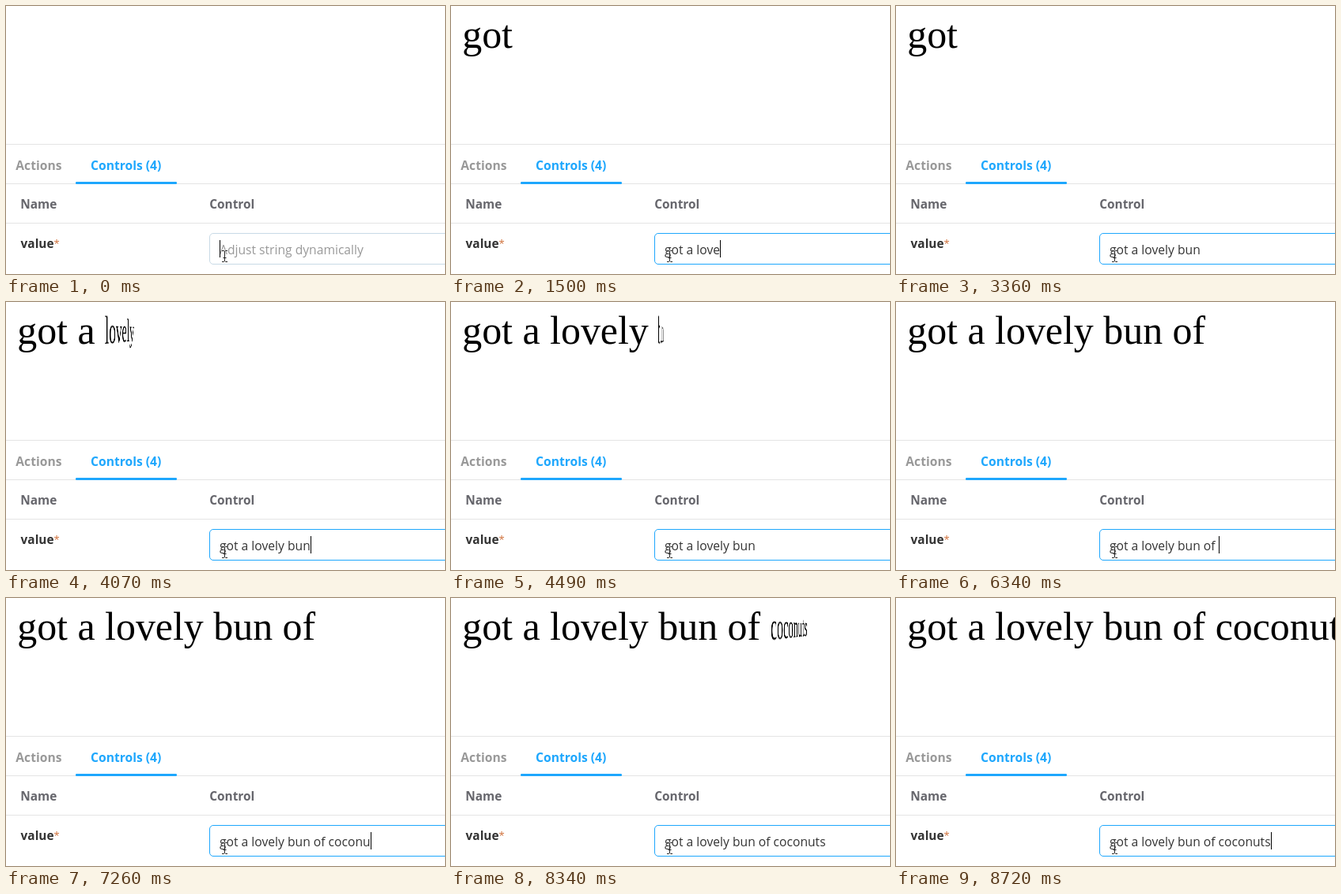
Write an HTML page that moves like this. It is 555x340 px and loops after 9.12 s.

```html
<!DOCTYPE html>
<html lang="en">
<head>
<meta charset="utf-8">
<title>Text control</title>
<style>
  html, body { margin: 0; width: 100%; height: 100%; overflow: hidden; background: #fff; }
  #stage { position: relative; width: 555px; height: 340px; overflow: hidden; }
  #ui { position: absolute; inset: 0; font: 15.65px "Open Sans", "Noto Sans", sans-serif; }
  #ui .bold { font-weight: 700; }
  #headline {
    position: absolute; left: 14.2px; top: 9px; margin: 0; white-space: pre;
    font: 49.9px/56px "Liberation Serif", "Times New Roman", serif; color: #000;
  }
  #headline span { display: inline-block; transform-origin: 0 50%; }
</style>
</head>
<body>
<div id="stage">
  <svg id="ui" width="555" height="340" viewBox="0 0 555 340">
    <defs>
      <path id="beam" d="M273 310.5h2.5l1 1 1-1h2.5M276.5 311v13M273 324.5h2.5l1-1 1 1h2.5"/>
    </defs>
    <g fill="#e4e4e4">
      <rect y="175" width="555" height="1"/>
      <rect y="225" width="555" height="1"/>
      <rect y="275" width="555" height="1"/>
    </g>
    <rect x="88" y="223" width="128" height="3" rx="1.2" fill="#1ea7fd"/>
    <g class="bold">
      <text x="12.3" y="208" fill="#999">Actions</text>
      <text x="107" y="208" fill="#1ea7fd">Controls (4)</text>
      <g font-size="15.4" fill="#66666c">
        <text x="18.3" y="257">Name</text>
        <text x="257.2" y="257">Control</text>
        <text x="18.6" y="307" fill="#333">value</text>
      </g>
    </g>
    <text x="60.5" y="306" font-size="13" fill="#d0703a">*</text>
    <rect id="field" x="257.5" y="288.5" width="320" height="39" rx="4.5" fill="#fff"/>
    <text id="hint" x="270" y="315" fill="#999">Adjust string dynamically</text>
    <text id="typed" x="270" y="315" fill="#333"></text>
    <rect id="caret" y="297" width="1" height="22" fill="#000"/>
    <g fill="none">
      <use href="#beam" stroke="#fff" stroke-width="2.4" stroke-opacity=".5"/>
      <use href="#beam" stroke="#222"/>
      <path d="M274.5 319.5h4" stroke="#222"/>
    </g>
  </svg>
  <p id="headline"></p>
</div>
<script>
const LOOP = 9120, BLINK = 530, DEPTH = 350;
const TEXT = "got a lovely bun of coconuts";

// Time of each key press, one per character of TEXT.
const KEYS = [400, 480, 560, 790, 870, 940, 1020, 1250, 1330, 1500, 1800, 1950, 2030,
  2260, 2580, 2810, 5940, 6110, 6190, 6340, 6570, 6720, 6800, 6950, 7180, 7260, 7490, 7640];

// Start and duration of each word swinging in.
const SWINGS = [[390, 250], [3345, 540], [3877, 540], [4390, 540], [6100, 240], [8150, 540]];

const $ = id => document.getElementById(id);
const clamp = v => Math.min(1, Math.max(0, v));
const easeInOut = p => p < .5 ? 2 * p * p : 1 - 2 * (1 - p) ** 2;
const mix = (a, b, p) => a.map((v, i) => Math.round(v + (b[i] - v) * p));

const words = TEXT.split(" ").map((word, i) => {
  const span = document.createElement("span");
  span.textContent = word;
  $("headline").append(i ? " " : "", span);
  return span;
});

// No-break spaces keep a trailing space in the measured width.
function setTyped(count) {
  const text = TEXT.slice(0, count).replace(/ /g, "\u00a0");
  if ($("typed").textContent !== text) $("typed").textContent = text;
  return count ? $("typed").getComputedTextLength() : 0;
}

function drawField(t) {
  const count = KEYS.filter(k => k <= t).length;
  const width = setTyped(count);
  const idle = t - (count ? KEYS[count - 1] : 0);
  $("hint").style.display = count ? "none" : "";
  $("caret").setAttribute("x", Math.round(270.2 + width));
  $("caret").style.display = Math.floor(idle / BLINK) % 2 ? "none" : "";
  const border = mix([200, 218, 230], [30, 167, 253], clamp((t - 400) / 240));
  $("field").setAttribute("stroke", `rgb(${border})`);
}

function drawWords(t) {
  words.forEach((word, i) => {
    const [start, duration] = SWINGS[i];
    const p = clamp((t - start) / duration);
    const angle = 90 * (1 - easeInOut(p));
    word.style.visibility = p > 0 ? "visible" : "hidden";
    word.style.transform = p < 1 ? `perspective(${DEPTH}px) rotateY(${angle}deg)` : "none";
  });
}

const begin = performance.now();
function frame() {
  const t = (performance.now() - begin) % LOOP;
  drawField(t);
  drawWords(t);
  requestAnimationFrame(frame);
}
frame();
</script>
</body>
</html>
```
